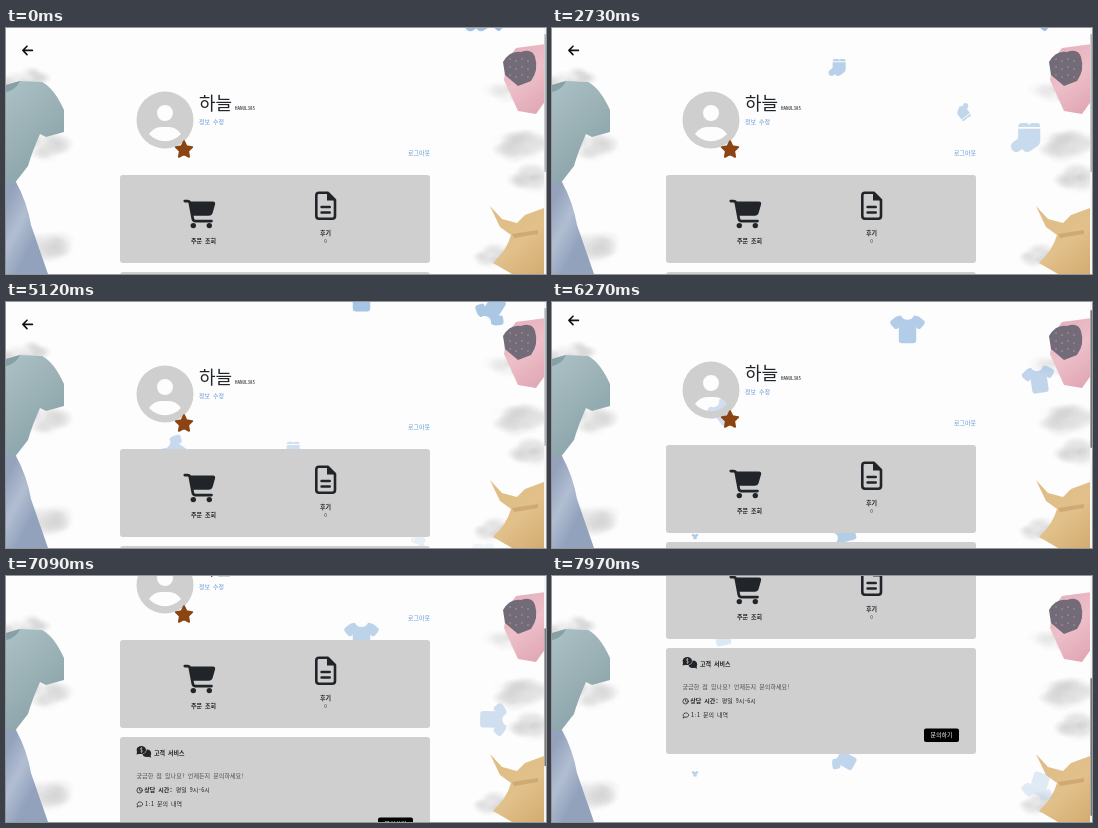
Animation, 540 px wide and 246 px high, one loop 8 s. Source, as an HTML page with a canvas:

```html
<!DOCTYPE html>
<html lang="ko">
<head>
<meta charset="utf-8">
<title>My page</title>
<style>
html, body { margin: 0; width: 100%; height: 100%; overflow: hidden; background: #fdfdfd; }
canvas { display: block; width: 540px; height: 246px; }
</style>
</head>
<body>
<canvas id="stage"></canvas>
<script>
const W = 540, H = 246, LOOP = 8000;
const MAX_SCROLL = 172, SCROLL_FROM = 6230, SCROLL_TO = 7970, IDLE = 390;
const INK = '#212529', PANEL = '#cfcfcf', LINK = '#5f93d6', CLOTH = '#9bbde0';
const FONT = '"Noto Sans Mono CJK KR", "Noto Sans CJK KR", "Noto Sans CJK", monospace';

const canvas = document.getElementById('stage');
const dpr = window.devicePixelRatio || 1;
canvas.width = W * dpr;
canvas.height = H * dpr;
const ctx = canvas.getContext('2d');

const clamp = u => Math.min(Math.max(u, 0), 1);
const ease = u => (1 - Math.cos(Math.PI * u)) / 2;

function fill(d, color, rule = 'nonzero') {
  ctx.fillStyle = color;
  ctx.fill(new Path2D(d), rule);
}

function line(d, width, color = INK) {
  ctx.strokeStyle = color;
  ctx.lineWidth = width;
  ctx.lineCap = ctx.lineJoin = 'round';
  ctx.stroke(new Path2D(d));
}

function box(x, y, w, h, r, color) {
  ctx.fillStyle = color;
  ctx.beginPath();
  ctx.roundRect(x, y, w, h, r);
  ctx.fill();
}

function oval(x, y, rx, ry, color) {
  ctx.fillStyle = color;
  ctx.beginPath();
  ctx.ellipse(x, y, rx, ry, 0, 0, 7);
  ctx.fill();
}

function at(x, y, draw) {
  ctx.save();
  ctx.translate(x, y);
  draw();
  ctx.restore();
}

function text(s, x, y, { color = INK, size = 6, bold = false, align = 'left' } = {}) {
  ctx.font = `${bold ? 'bold ' : ''}${size}px ${FONT}`;
  ctx.textAlign = align;
  ctx.textBaseline = 'middle';
  ctx.fillStyle = color;
  ctx.fillText(s, x, y);
}

// both shapes sit in a box about 64 or 51 units wide, centred on 0,0
const half = 'M0 -18Q8 -18 12 -26Q18 -26 22 -23L31 -16Q33 -12 30 -9L24 -2Q21 0 18 -2L16 -5V19Q16 25 10 25H0z';
const sock = 'M6 -16H26V5Q26 11 21 15L9 23Q2 28 -4 22Q-10 13 -2 7L4 3Q6 1 6 -1zM6 -19Q6 -26 13 -26H20Q26 -26 26 -19z';
const shapes = {
  shirt: { width: 64, path: join(half, new DOMMatrix([-1, 0, 0, 1, 0, 0])) },
  socks: { width: 51, path: join(sock, new DOMMatrix([1, 0, 0, 1, -19, 0])) }
};

function join(d, matrix) {
  const path = new Path2D(d);
  path.addPath(new Path2D(d), matrix);
  return path;
}

const clothes = [
  { kind: 'socks', x: 473.5, size: 29, start: 0, time: 5950 },
  { kind: 'socks', x: 285, size: 17, start: 100, time: 9200 },
  { kind: 'socks', x: 412.5, size: 14, start: 250, time: 6220, spin: 360 },
  { kind: 'shirt', x: 355.5, size: 35, start: 4070, time: 8800 },
  { kind: 'shirt', x: 487, size: 33, start: 4150, time: 5500, turn: 95, spin: 665 },
  { kind: 'shirt', x: 170, size: 30, start: -1000, time: 13500, turn: 215, spin: 200, rises: true },
  { kind: 'shirt', x: 293, size: 27, start: 3330, time: 12500, turn: 180, spin: 320, rises: true },
  { kind: 'shirt', x: 143, size: 7, start: 2590, time: 16000, rises: true }
];

function drift({ kind, x, size, start, time, turn = 0, spin = 0, rises = false }, t) {
  const u = clamp((t - start) / time), { width, path } = shapes[kind];
  const top = -14, bottom = 270, s = ease(rises ? 1 - u : u);
  at(x, top + (bottom - top) * s, () => {
    ctx.rotate((turn + spin * u) * Math.PI / 180);
    ctx.scale(size / width, size / width);
    ctx.globalAlpha = 1 - u;
    ctx.fillStyle = CLOTH;
    ctx.fill(path);
  });
}

function fade(x0, y0, x1, y1, ...colors) {
  const g = ctx.createLinearGradient(x0, y0, x1, y1);
  colors.forEach((c, i) => g.addColorStop(i / (colors.length - 1), c));
  return g;
}

function cloud(cx, cy, rx, ry, seed) {
  const rnd = () => (seed = seed * 16807 % 2147483647) / 2147483647;
  for (let i = 0; i < 26; i++) {
    const a = rnd() * 6.283, q = Math.sqrt(rnd()) * .7;
    const r = ry * (.4 + rnd() * .35), v = 195 + rnd() * 45 | 0;
    at(cx + Math.cos(a) * q * rx, cy + Math.sin(a) * q * ry, () => {
      ctx.scale(1.6, 1);
      const g = ctx.createRadialGradient(0, 0, 0, 0, 0, r);
      g.addColorStop(0, `rgba(${v},${v},${v},.4)`);
      g.addColorStop(1, `rgba(${v},${v},${v},0)`);
      oval(0, 0, r, r, g);
    });
  }
}

function scenery() {
  cloud(38, 118, 34, 14, 71);
  cloud(16, 51, 32, 11, 12);
  cloud(38, 220, 30, 16, 33);
  cloud(512, 62, 34, 12, 94);
  cloud(514, 118, 34, 14, 25);
  cloud(526, 150, 20, 13, 64);
  cloud(492, 230, 28, 12, 87);

  // jeans and tee
  fill('M0 150L10 154Q21 174 25 197L42 246H0z', fade(0, 175, 38, 195, '#94a2bd', '#b1bed2', '#92a1bc'));
  fill('M0 57L14 53L36 54Q48 60 58 82V104L40 109L34 106Q26 124 22 138L8 156L0 153z',
    fade(0, 60, 50, 115, '#a9c0c4', '#9db3b7', '#8fa8ad'));
  fill('M0 57L14 53Q10 62 0 64z', '#86a0a5');

  // hat
  fill('M510 20L540 16V72L530 86L512 83L498 52L501 32z', fade(498, 20, 540, 80, '#e4afba', '#edbfc9', '#e0a6b4'));
  fill('M497 34Q504 22 515 24Q526 20 529 29Q533 42 525 53L512 58L499 47z', '#736c78');
  for (let i = 0; i < 12; i++) oval(504 + i % 4 * 6, 31 + (i / 4 | 0) * 8 + i % 2 * 2, .7, .7, '#b5a3ae');

  // dress
  fill('M484 178L496 191L511 195L519 187L538 180L540 246H506L487 235Q501 222 505 207L494 199z',
    fade(488, 185, 540, 245, '#dfbd85', '#e2c08a', '#d2ab70'));
  fill('M506 206L532 202V206L508 210z', 'rgba(165,120,65,.3)');
}

function star(cx, cy, r) {
  let d = '';
  for (let i = 0; i < 10; i++) {
    const a = (i / 5 - .5) * Math.PI, q = i % 2 ? r * .5 : r;
    d += `${i ? 'L' : 'M'}${cx + q * Math.cos(a)} ${cy + q * Math.sin(a)}`;
  }
  fill(d + 'z', '#8b4513');
  line(d + 'z', 2, '#8b4513');
}

function avatar() {
  const disc = 'M-28.5 0A28.5 28.5 0 1 1 28.5 0A28.5 28.5 0 1 1 -28.5 0z';
  const head = 'M-8 -7A8 8 0 1 1 8 -7A8 8 0 1 1 -8 -7z';
  const body = 'M-16 14Q-11 7 -4 7H4Q11 7 16 14A21.3 21.3 0 0 1 -16 14z';
  fill(disc + head + body, PANEL, 'evenodd');
}

function cart() {
  line('M1.3 1.3H4Q6 1.3 6.3 3L9.3 19Q9.7 21.3 12 21.3H28', 2.7);
  fill('M6 1.8H29.5Q32 1.8 31.6 4.5L29.2 13Q28.4 16 25 16H8.5z', INK);
  oval(9.8, 25.8, 2.7, 2.7, INK);
  oval(25.8, 25.8, 2.7, 2.7, INK);
}

function sheet() {
  line('M13 1.3H4Q1.3 1.3 1.3 4V24.5Q1.3 27.2 4 27.2H17.3Q20 27.2 20 24.5V8.5z', 2.6);
  fill('M12 1V9H20z', INK);
  line('M6.6 15.5H14.7M6.6 21H14.7', 2.6);
}

function chat() {
  oval(10.3, 7.2, 4.3, 3.8, INK);
  fill('M11 10L14.6 11.8L13.5 7z', INK);
  oval(4.8, 4, 5.2, 4.4, PANEL);
  oval(4.8, 4, 4.7, 4, INK);
  fill('M.8 5L0 8.5L5 7.5z', INK);
  text('$', 4.8, 4, { color: PANEL, size: 5.5, bold: true, align: 'center' });
}

function page() {
  line('M21 18.2L16.9 22.4L21 26.6M16.9 22.4H26.4', 1.6, '#111');
  at(159, 92, avatar);
  star(178, 121.8, 8.6);
  text('하늘', 193, 74.8, { size: 18 });
  text('HANUL385', 229, 80, { size: 5 });
  text('정보 수정', 193, 93.8, { color: LINK });
  text('로그아웃', 424, 125, { color: LINK, align: 'right' });

  box(114, 147, 310, 88, 3, PANEL);
  at(177.5, 171.8, cart);
  at(309, 163.5, sheet);
  text('주문 조회', 197.5, 212.7, { bold: true, align: 'center' });
  text('후기', 319.5, 204.5, { bold: true, align: 'center' });
  text('0', 319.5, 213.3, { color: '#444', size: 5.2, align: 'center' });

  box(114, 244, 310, 106, 3, PANEL);
  at(130.5, 253, chat);
  text('고객 서비스', 148, 260.2, { bold: true });
  text('궁금한 점 있나요? 언제든지 문의하세요!', 130.5, 282.7, { color: '#4b4d50', size: 6.08 });
  line('M136.3 297.3a2.7 2.7 0 1 1-5.4 0a2.7 2.7 0 1 1 5.4 0zM133.6 295.6V297.4L134.8 298.2', .8);
  text('상담 시간:', 138.3, 297.2, { bold: true });
  text('평일 9시-6시', 169.8, 297.2);
  line('M131.2 313.8L131.7 312.4A2.7 2.2 0 1 1 133 313.2z', .8);
  text('1:1 문의 내역', 139, 311.2);
  box(372, 324.5, 35, 13.5, 2, '#000');
  text('문의하기', 389.5, 331, { color: '#fff', align: 'center' });
}

function render(t) {
  const u = clamp((t - SCROLL_FROM) / (SCROLL_TO - SCROLL_FROM)) ** 1.035;
  ctx.setTransform(dpr, 0, 0, dpr, 0, 0);
  ctx.fillStyle = '#fdfdfd';
  ctx.fillRect(0, 0, W, H);
  scenery();
  clothes.forEach(item => drift(item, Math.max(t, IDLE)));
  at(0, -Math.round(MAX_SCROLL * u), page);

  box(538, 0, 2, H, 0, '#f4f4f4');
  box(538.4, 6 + 96 * u, 1.6, 138, .8, u > 0 ? '#777' : '#b4b4b4');
}

const start = performance.now();
function tick() {
  render((performance.now() - start) % LOOP);
  requestAnimationFrame(tick);
}
tick();
</script>
</body>
</html>
```
